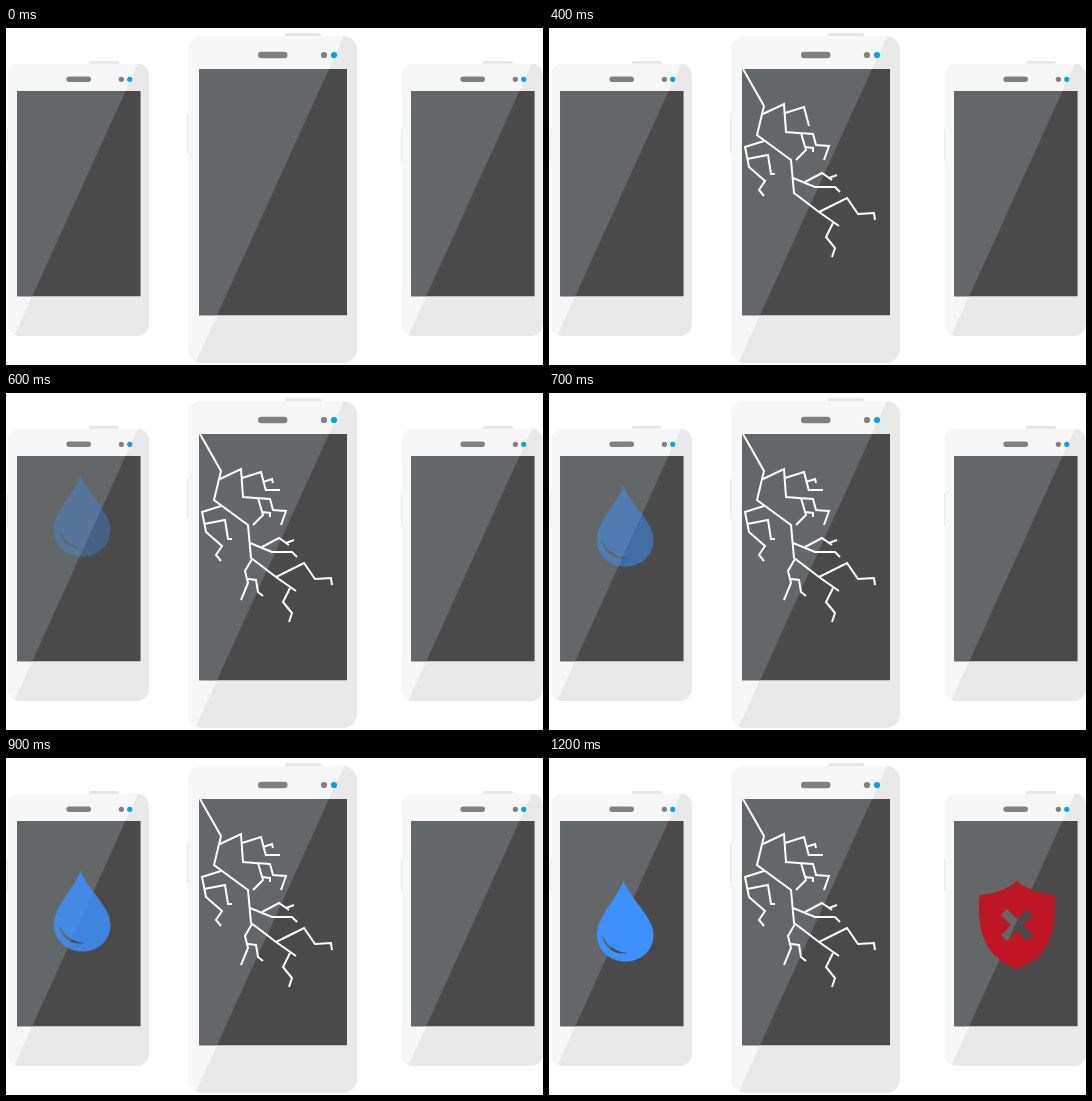
These frames come from a looping animation (537 by 337 pixels, 1300 ms). An HTML page:

```html
<!DOCTYPE html>
<html>
<head>
<meta charset="utf-8">
<style>
  html, body { margin: 0; width: 100%; height: 100%; overflow: hidden; background: #fff; }
  svg { display: block; width: 537px; height: 337px; }
</style>
</head>
<body>
<svg viewBox="0 0 537 337">
  <defs>
    <clipPath id="body"><rect x="182" y="8" width="169" height="327" rx="14"/></clipPath>
    <g id="phone">
      <path fill="#e6e6e6" d="M279 9V7q0-2 2-2H313q2 0 2 2V9ZM183 85q-2 0-2 2V124q0 2 2 2Z"/>
      <g clip-path="url(#body)">
        <path fill="#e9e9e9" d="M182 8H351V335H182Z"/>
        <path fill="#f7f7f7" d="M182 8H338L189.300 335H182Z"/>
      </g>
      <path fill="#4a4a4a" d="M193 41H341V287.300H193Z"/>
      <path fill="#636767" d="M193 41H323L211 287.300H193Z"/>
      <rect x="252" y="23.700" width="29.500" height="6.600" rx="3.300" fill="#808080"/>
      <circle cx="318" cy="27" r="3.100" fill="#808080"/>
      <circle cx="328" cy="27" r="3.100" fill="#00a5ee"/>
    </g>
  </defs>
  <use href="#phone" transform="translate(-149.600 28.800) scale(.8333)"/>
  <use href="#phone"/>
  <use href="#phone" transform="translate(244.400 28.800) scale(.8333)"/>
  <g id="cracks" fill="none" stroke="#fff" stroke-width="2"></g>
  <path id="drop" fill="#3d91ff" fill-rule="evenodd" d="M74.500 123
    C82 142 104.500 159 104.500 176.500C104.500 193 92 203.500 76.500 203.500
    S48 193 48 176.500C48 159 67 142 74.500 123Z
    M53 177C54 189 66 198 79 195C68 194.500 58 188 53 177Z"/>
  <path id="shield" fill="#be1622" fill-rule="evenodd" d="M468 123
    C458 132 443 136 430.500 137C428 170 434 199 468 211
    C502 199 508 170 506 137C493 136 478 132 468 123Z
    M458 151L452 157L462 167L452 177L458 183L468 173L478 183L484 177L474 167L484 157L478 151L468 161Z"/>
</svg>
<script>
const LOOP = 1300, STEP = 100;
const $ = id => document.getElementById(id);
const ramp = (t, from, to) => Math.min(1, Math.max(0, (t - from) / (to - from)));

// Each crack group grows from its root between two times.
const groups = [
  { from: 100, to: 300, lines: [
    "194,41 215,78 208,107 242,132 245,165 270,184 290,198"
  ] },
  { from: 200, to: 400, lines: [
    "214,86 235,76 237,104 264,106 267,117 280,118 275,132",
    "236,85 255,79 260,98",
    "252,105 257,122 247,132",
    "256,119 264,120 264,124",
    "215,113 196,119 200,139 216,153 210,162 215,168",
    "198,131 219,127 222,146 226,146",
    "244,150 266,159 286,159 291,164",
    "256,154 273,145 283,152",
    "280,150 288,147",
    "270,184 298,170 309,186 325,185 326,192",
    "284,195 277,209 286,220 283,229"
  ] },
  { from: 400, to: 600, lines: [
    "257,89 266,86 267,90",
    "259,97 274,97",
    "246,166 239,178 242,190 235,207",
    "242,186 250,187 252,199 257,203"
  ] }
];

const DASH = 1.01;
for (const g of groups) {
  g.paths = g.lines.map(points => {
    const path = document.createElementNS("http://www.w3.org/2000/svg", "path");
    path.setAttribute("d", "M" + points.replaceAll(" ", "L"));
    path.setAttribute("pathLength", 1);
    path.setAttribute("stroke-dasharray", DASH + " 2");
    $("cracks").append(path);
    return path;
  });
}

function draw(t) {
  for (const g of groups) {
    const p = ramp(t, g.from, g.to);
    for (const path of g.paths) {
      path.setAttribute("stroke-dashoffset", DASH * (1 - p));
      path.setAttribute("visibility", p ? "visible" : "hidden");
    }
  }
  const fall = ramp(t, 400, 1000);
  $("drop").setAttribute("opacity", fall);
  $("drop").setAttribute("transform", `translate(0 ${60 * (fall - 1)})`);
  $("shield").setAttribute("opacity", t < 1100 ? 0 : t < 1200 ? 0.18 : 1);
}

function tick() {
  const t = performance.now() % LOOP;
  draw(Math.floor(t / STEP) * STEP);
  requestAnimationFrame(tick);
}
tick();
</script>
</body>
</html>
```
